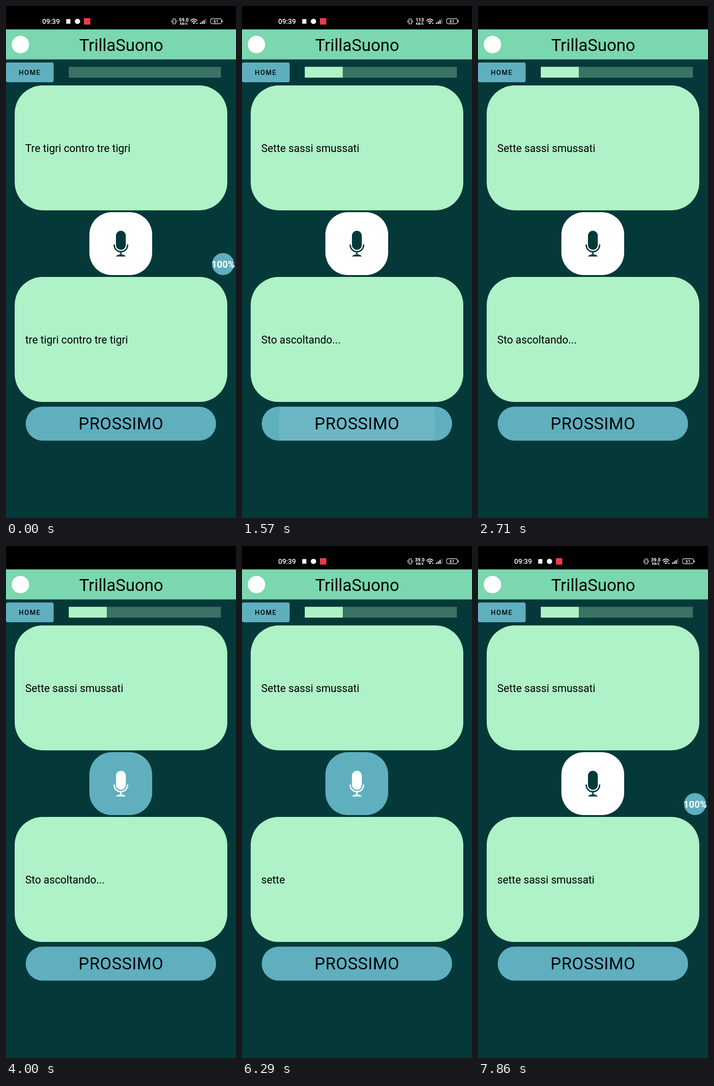
Write an HTML page that moves like this. It is 502x1115 px and loops after 8 s.

```html
<!DOCTYPE html>
<html lang="it">
<head>
<meta charset="utf-8">
<title>TrillaSuono</title>
<style>
  html, body { margin: 0; width: 100%; height: 100%; overflow: hidden; background: #053939; }
  svg { display: block; width: 100%; height: 100%; font-family: Roboto, sans-serif; }
  .mid { text-anchor: middle; }
  .phrase { font-size: 23.2px; }
  .blue { fill: #5fafbf; }
  .mint { fill: #aff2c7; }
  .line { fill: none; stroke: #fff; stroke-linecap: round; }
</style>
</head>
<body>
<svg viewBox="0 0 502 1115">
  <clipPath id="pill"><rect x="43" y="872.5" width="415.5" height="74" rx="37"/></clipPath>
  <rect width="502" height="1115" fill="#053939"/>
  <rect width="502" height="51"/>

  <g id="status" fill="#fff">
    <text x="79" y="39" font-size="15.2" font-weight="500">09:39</text>
    <rect x="131.5" y="28.5" width="9" height="10"/>
    <circle cx="156" cy="33.5" r="5.8"/>
    <rect x="170" y="26.5" width="14" height="14" fill="#ee3b4c"/>
    <path class="line" stroke-width="1.2" d="M364.5 28h5v11h-5zM361.8 31v5M372.3 31v5"/>
    <text id="speed" class="mid" x="388" y="34" font-size="10.5" font-weight="700"></text>
    <text class="mid" x="388" y="41" font-size="7.2" font-weight="700">KB/S</text>
    <path class="line" stroke-width="1.7" d="M403 31.5q7-6.5 14 0M405.5 34.5q4.5-4 9 0"/>
    <path d="M407.5 36.8q2.5-2 5 0l-2.5 2.7zM414.5 37h4l-2 2.5z"/>
    <path d="M423.5 36h2.3v3h-2.3zM427.3 33.5h2.3v5.5h-2.3zM431.1 30.5h2.3v8.5h-2.3z"/>
    <path opacity=".35" d="M435 27.5h2.3v11.5h-2.3z"/>
    <rect class="line" x="446.6" y="27.6" width="23.5" height="11" rx="3.5" stroke-width="1.1"/>
    <rect x="471.3" y="31" width="1.5" height="4.5" rx=".7"/>
    <text class="mid" x="458.3" y="36.6" font-size="9.5" font-weight="500">61</text>
  </g>

  <rect y="51" width="502" height="65.3" fill="#7ad7af"/>
  <circle cx="31.5" cy="84" r="19" fill="#fff"/>
  <text class="mid" x="251.5" y="98" font-size="36.6">TrillaSuono</text>

  <rect class="blue" y="123" width="104" height="43" rx="4"/>
  <text x="28" y="150" font-size="14.6" font-weight="500" letter-spacing="1.6">HOME</text>
  <rect x="137" y="132.5" width="332" height="23.5" fill="#3a7365"/>
  <rect id="bar" class="mint" x="137" y="132.5" height="23.5"/>

  <rect class="mint" x="19" y="173" width="464" height="272" rx="61"/>
  <text id="prompt" class="phrase" x="42" y="318"></text>
  <rect class="mint" x="19" y="590" width="464" height="272.3" rx="61"/>
  <text id="heard" class="phrase" x="42" y="735"></text>

  <rect id="micBox" x="182" y="449" width="137" height="137" rx="49"/>
  <g id="mic">
    <rect x="240" y="489.5" width="21.5" height="41.5" rx="10.7"/>
    <path fill="none" stroke="currentColor" stroke-width="3" stroke-linecap="round" d="M236.2 520.5a14.6 14.6 0 0 0 29.2 0M250.8 536v7"/>
    <path d="M240.3 545.5Q242 541 250.8 541T261.3 545.5Z"/>
  </g>

  <g clip-path="url(#pill)">
    <rect class="blue" x="43" y="872" width="416" height="75"/>
    <circle id="ripple" cx="250.500" cy="910" fill="#fff"/>
  </g>
  <text class="mid" x="251" y="922" font-size="36.6" letter-spacing=".5">PROSSIMO</text>

  <g id="badge">
    <circle class="blue" cx="473.7" cy="562" r="24"/>
    <text class="mid" x="474" y="570" font-size="20.8" font-weight="700" fill="#fff">100%</text>
  </g>
</svg>
<script>
const el = id => document.getElementById(id);
const ramp = (t, from, to) => Math.min(1, Math.max(0, (t - from) / (to - from)));

// Last value whose start time has passed
const pick = (t, steps) => steps.filter(([start]) => t >= start).pop()[1];

const speeds = [[0, "59.0"], [290, "113"], [4000, "39.0"]];
const prompts = [[0, "Tre tigri contro tre tigri"], [1570, "Sette sassi smussati"]];
const replies = [
  [0, "tre tigri contro tre tigri"], [1570, "Sto ascoltando..."],
  [6290, "sette"], [6710, "sette sassi"], [7570, "sette sassi smussati"]
];

function draw(t) {
  el("speed").textContent = pick(t, speeds);
  el("prompt").textContent = pick(t, prompts);
  el("heard").textContent = pick(t, replies);
  el("bar").setAttribute("width", t < 1570 ? 0 : 83);
  el("badge").style.display = t < 1570 || t >= 7710 ? "" : "none";

  const hidden = ramp(t, 2430, 2710) - ramp(t, 4140, 4500);
  el("status").style.opacity = 1 - hidden;

  const listening = t >= 4000 && t < 7140;
  const ink = listening ? "#fff" : "#033a3a";
  el("micBox").style.fill = listening ? "#5fafbf" : "#fff";
  el("mic").style.fill = el("mic").style.color = ink;

  el("ripple").setAttribute("r", 30 + 190 * ramp(t, 1430, 1620));
  el("ripple").style.opacity = t < 1430 ? 0 : 0.09 * (1 - ramp(t, 1640, 2200));
}

function tick() {
  draw(performance.now() % 8000);
  requestAnimationFrame(tick);
}
tick();
</script>
</body>
</html>
```
